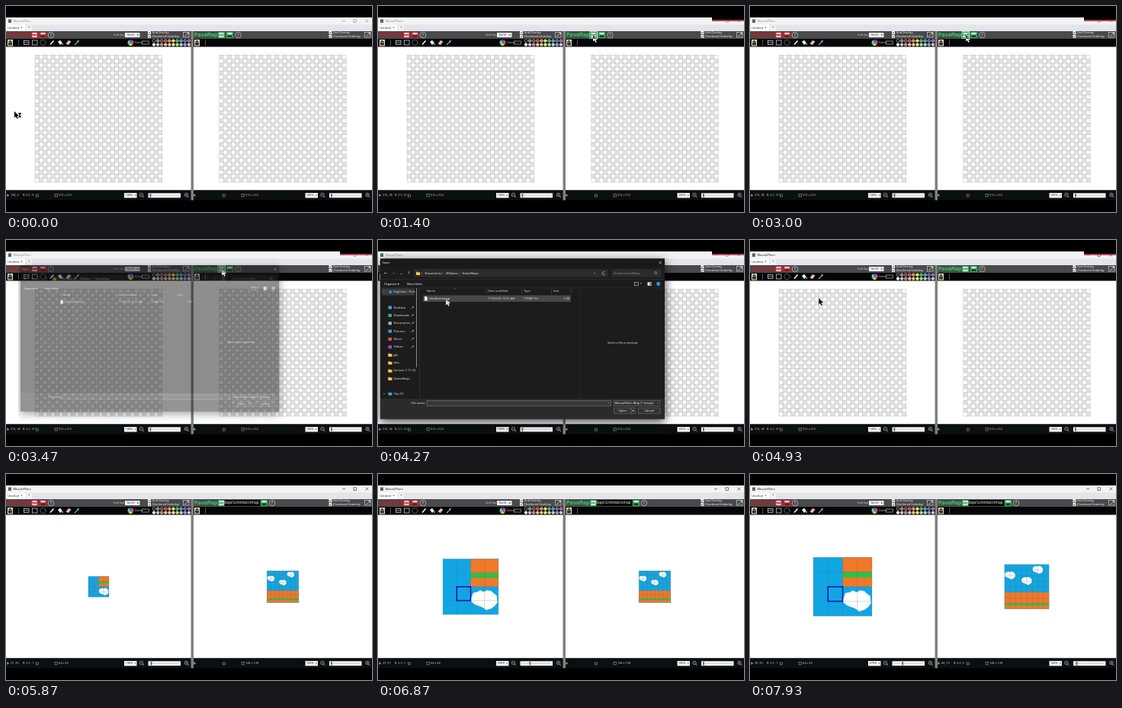
Animation, 480 px wide and 270 px high, one loop 8000 ms. Source, as an HTML page with a canvas:

```html
<!DOCTYPE html>
<html lang="en">
<head>
<meta charset="utf-8">
<title>Tile editor</title>
<style>
html, body { margin: 0; width: 100%; height: 100%; overflow: hidden; background: #000; }
canvas { display: block; width: 480px; height: 270px; }
</style>
</head>
<body>
<canvas id="stage"></canvas>
<script>
const W = 480, H = 270, LOOP = 8000, LOAD = 5130, UNIT = 0.325;
const dpr = window.devicePixelRatio || 1;
const stage = document.getElementById('stage');
const layer = document.createElement('canvas');
for (const c of [stage, layer]) { c.width = W * dpr; c.height = H * dpr; }
const main = stage.getContext('2d'), over = layer.getContext('2d');
let g = main;

const CENTER = [{ x: 121.5, y: 147.7 }, { x: 363, y: 147.7 }];
const PATH = [
  [70, 11, 138], [530, 60, 118], [730, 60, 118], [1130, 204, 77], [1330, 282, 38],
  [1600, 282, 38], [2130, 283, 38], [3870, 283, 38], [4270, 89, 77], [4470, 89, 77],
  [4730, 90, 76], [5330, 90, 76], [5700, 117, 149], [6800, 117, 149], [6930, 119, 156],
  [7000, 119, 156], [7470, 372, 152]
];
const ZOOM_L = [[5730, 110], [5800, 120], [5870, 130], [5930, 140], [6000, 150], [6070, 160],
  [6130, 180], [6200, 190], [6270, 200], [6330, 215], [6470, 240], [6530, 264],
  [6670, 290], [6730, 310], [6800, 330], [6870, 350], [6930, 370]];
const ZOOM_R = [[7600, 110], [7730, 120], [7800, 130], [7870, 140]];
const CLOUD = [[1, 12], [3, 7], [8, 6], [11, 4], [15, 6], [19, 4], [24, 5], [27, 8], [30, 10],
  [31, 18], [28, 22], [24, 25], [18, 27], [14, 24], [9, 22], [4, 20], [0, 16]];
const SWATCHES = ['#000', '#777', '#8b1a1a', '#ed1c24', '#ff7f27', '#fff200', '#22b14c', '#00a2e8', '#3f48cc', '#a349a4',
  '#fff', '#c3c3c3', '#b97a57', '#ffaec9', '#ffc90e', '#efe4b0', '#b5e61d', '#99d9ea', '#7092be', '#c8bfe7'];

const clamp = (v, a, b) => Math.min(b, Math.max(a, v));
const prog = (t, a, b) => clamp((t - a) / (b - a), 0, 1);
const smooth = p => p * p * (3 - 2 * p);

function held(keys, t) {
  let v = 100;
  for (const [at, z] of keys) if (t >= at) v = z;
  return v;
}
function pointer(t) {
  let a = PATH[0];
  for (const b of PATH) {
    if (t < b[0]) {
      const p = smooth(prog(t, a[0], b[0]));
      return { x: a[1] + (b[1] - a[1]) * p, y: a[2] + (b[2] - a[2]) * p };
    }
    a = b;
  }
  return { x: a[1], y: a[2] };
}

function box(x, y, w, h, fill) { g.fillStyle = fill; g.fillRect(x, y, w, h); }
function frame(x, y, w, h, color, lw = 0.7) { g.strokeStyle = color; g.lineWidth = lw; g.strokeRect(x, y, w, h); }
function line(color, lw, ...p) {
  g.strokeStyle = color; g.lineWidth = lw; g.beginPath();
  for (let i = 0; i < p.length; i += 2) g.lineTo(p[i], p[i + 1]);
  g.stroke();
}
function poly(points, fill) {
  g.fillStyle = fill; g.beginPath();
  for (const [x, y] of points) g.lineTo(x, y);
  g.closePath(); g.fill();
}
function dot(x, y, r, fill, stroke, lw = 0.7) {
  g.beginPath(); g.arc(x, y, r, 0, 7);
  if (fill) { g.fillStyle = fill; g.fill(); }
  if (stroke) { g.strokeStyle = stroke; g.lineWidth = lw; g.stroke(); }
}
function text(s, x, y, color = '#fff', size = 4, align = 'left', face = '"Open Sans", sans-serif') {
  g.font = `${size}px ${face}`; g.fillStyle = color;
  g.textAlign = align; g.textBaseline = 'middle';
  g.fillText(s, x, y);
}
function logo(s, x, color) {
  g.font = 'bold 7.2px "DejaVu Sans Mono", monospace'; g.fillStyle = color;
  g.textAlign = 'left'; g.textBaseline = 'middle'; g.fillText(s, x, 38.3);
}

function fileIcon(x, color, save) {
  box(x, 34, 9, 8, color);
  box(x + 1.5, 35, 6, 2.2, '#eee');
  box(x + 1.5, 38.5, 6, 2.5, save ? '#333' : '#eee');
  if (!save) poly([[x + 3, 37.5], [x + 6, 37.5], [x + 4.5, 40]], color);
}
function help(x) {
  dot(x, 38, 3.8, null, '#ddd', 0.6);
  text('?', x, 38.2, '#eee', 5.5, 'center');
}
function check(x, y, label) {
  box(x, y - 2, 4, 4, '#fff');
  line('#222', 0.7, x + 0.8, y, x + 1.7, y + 1.1, x + 3.3, y - 1.2);
  text(label, x + 5.5, y, '#fff', 3.8);
}
function toolbar(x) {
  const cx = x ? 423.5 : 186, ex = x ? 470.5 : 232.5;
  check(cx, 35, 'Grid Overlay');
  check(cx, 39.8, 'Checkered Underlay');
  frame(ex, 34.5, 7.5, 6.5, '#ddd', 0.6);
  line('#eee', 0.7, ex + 2, 40, ex + 7, 35);
  line('#eee', 0.7, ex + 4.5, 35, ex + 7, 35, ex + 7, 37.5);
  box(x + 2, 44, 7, 8.5, '#e9e3bd');
  box(x + 3, 47.5, 5, 4, '#333');
  poly([[x + 3, 47], [x + 8, 47], [x + 5.5, 44.5]], '#333');
  line('#888', 0.6, x + 16.5, 44, x + 16.5, 52);
}
function tools() {
  frame(23.5, 45.5, 6.5, 5, '#ddd'); line('#ddd', 0.6, 23.5, 48, 30, 48);
  frame(34.5, 45, 6.5, 6, '#ddd');
  g.setLineDash([1, 0.8]); dot(48.5, 48, 3.6, null, '#eee'); g.setLineDash([]);
  line('#eee', 1.7, 58, 50.5, 62.5, 45.5);
  poly([[68, 47], [71, 44.8], [74, 48.5], [71, 51]], '#eee'); dot(74.2, 50, 1, '#4ab4ef');
  poly([[78.5, 49.5], [82, 45], [85.5, 46.5], [82, 51]], '#f0b4bb');
  line('#eee', 1, 90, 51, 94, 47); line('#55aee8', 2, 93.5, 47.5, 95.5, 45.2);
  for (let i = 0; i < 6; i++) {
    g.beginPath(); g.moveTo(163.5, 48);
    g.arc(163.5, 48, 4, i * Math.PI / 3, (i + 1) * Math.PI / 3);
    g.fillStyle = `hsl(${i * 60} 75% 58%)`; g.fill();
  }
  text('Color:', 169, 48, '#ddd', 3.7);
  frame(178.5, 46, 9, 4, '#ccc', 0.6);
  SWATCHES.forEach((c, i) => dot(194 + i % 10 * 5.1, i < 10 ? 45.6 : 50.6, 1.9, c, '#ddd', 0.6));
}
function lens(x, sign) {
  dot(x, 247.5, 2.3, null, '#ccc', 0.6);
  line('#ccc', 0.8, x + 1.7, 249.2, x + 3.5, 251);
  line('#ccc', 0.5, x - 1.2, 247.5, x + 1.2, 247.5);
  if (sign) line('#ccc', 0.5, x, 246.3, x, 248.7);
}
function status(x, zx, pos, size, zoom) {
  poly([[x + 1.5, 246], [x + 4, 248.3], [x + 1.5, 250]], '#aaa');
  if (pos) {
    text(`${pos.x}, ${pos.y}`, x + 6, 248.3, '#ddd', 3.8);
    text(`R: ${pos.y >> 4} C: ${pos.x >> 4}`, x + 22, 248.3, '#ddd', 3.8);
  }
  frame(x + 39.3, 247, 3, 3, '#bbb', 0.5);
  frame(x + 64, 246.7, 3.2, 3.2, '#bbb', 0.5);
  text(`${size} x ${size}`, x + 69, 248.3, '#ddd', 3.8);
  box(zx, 245, 16.5, 6.5, '#f4f4f4');
  text(zoom + '%', zx + 1.5, 248.3, '#222', 3.8);
  poly([[zx + 13.3, 247.6], [zx + 15.3, 247.6], [zx + 14.3, 249]], '#444');
  lens(zx + 22.5, false);
  box(zx + 31.5, 245.3, 42.5, 6, '#f4f4f4');
  line('#bbb', 0.7, zx + 33, 248.3, zx + 72, 248.3);
  box(zx + 33.5 + (zoom - 100) / 25, 246, 1.8, 4.5, '#666');
  lens(zx + 81.5, true);
}

function checkers(c) {
  const s = 5.2, x = c.x - 83.2, y = c.y - 83.2;
  for (let r = 0; r < 32; r++) for (let k = r % 2; k < 32; k += 2) box(x + k * s, y + r * s, s, s, '#e2e2e2');
  grid(x, y, 166.4, 32, 'rgba(140,140,140,.55)', 0.5);
}
function grid(x, y, size, n, color, lw) {
  for (let i = 0; i <= n; i++) {
    const d = i * size / n;
    line(color, lw, x + d, y, x + d, y + size);
    line(color, lw, x, y + d, x + size, y + d);
  }
}
function cloud(x, y) { poly(CLOUD.map(p => [p[0] + x, p[1] + y]), '#fff'); }
function art(c, size, zoom, paint) {
  const k = UNIT * zoom / 100, w = size * k, x = c.x - w / 2, y = c.y - w / 2;
  g.save();
  g.translate(x, y); g.scale(k, k);
  box(0, 0, size, size, '#10a6e4');
  paint();
  g.restore();
  grid(x, y, w, size / 16, 'rgba(105,105,105,.5)', 0.55);
  return { x, y, k };
}
function ground(x, y, w, h, grass) {
  box(x, y, w, h, '#f07828');
  box(x, grass, w, 6, '#2bc04a');
}

function cornerButtons(active) {
  const c = active ? '#222' : '#888';
  line(c, 0.6, 441, 19.7, 445, 19.7);
  frame(456, 17.8, 3.6, 3.6, c, 0.6);
  line(c, 0.6, 471.5, 17.8, 475.2, 21.5); line(c, 0.6, 475.2, 17.8, 471.5, 21.5);
}

function app(t, cur) {
  const loaded = t >= LOAD, active = t >= 4670;
  const zl = held(ZOOM_L, t), zr = held(ZOOM_R, t);
  box(0, 0, W, H, '#000');
  box(0, 15, W, 10, '#f3f3f3');
  box(3, 17.5, 4, 4.5, '#47705a');
  text('MosaicPliers', 9.5, 20, active ? '#111' : '#8a8a8a', 4);
  cornerButtons(active);
  if (t >= 330 && t < 5060) { box(438, 15, 42, 3.5, '#000'); box(438, 18.5, 42, 1.3, '#c4122f'); }
  box(0, 24.5, W, 8.5, '#e4e4eb');
  box(0.5, 24.5, 25, 8.5, '#fff'); box(27, 25.5, 7, 7, '#f3f3f6');
  text('Untitled', 2, 28.5, '#222', 4);
  text('×', 20.5, 28.5, '#333', 4.5, 'center');
  text('+', 30.3, 29, '#555', 4.5, 'center');

  box(0, 33, W, 10, '#4a4a4a');
  box(0, 43, W, 10.5, '#050608');
  box(0, 53.5, W, 188, '#fff');
  box(0, 241.5, W, 13, '#0a0f12');
  box(242.5, 33, 3.5, 221.5, '#808080');

  logo('PaveSet', 2, '#d3141c');
  fileIcon(33, '#d8202a', false); fileIcon(44, '#d8202a', true); help(59);
  text('Grid Size:', 141, 38, '#ddd', 3.5);
  box(156, 35, 19.5, 6, '#eee'); text('16x16', 158, 38.1, '#222', 3.7);
  poly([[171.5, 37.4], [174, 37.4], [172.7, 39]], '#333');
  toolbar(0); tools();

  logo('PaveMap', 247, '#25d366');
  if (t >= 1330 && t < 3870) box(277.5, 33.3, 10.5, 9.4, '#eaf8ef');
  fileIcon(278, '#25b455', false);
  if (loaded) {
    box(286.5, 34, 47, 8, '#050505');
    text('Maps\\Untitled.ttmap', 331.5, 38.2, '#fff', 4.8, 'right');
    fileIcon(334, '#25b455', true); help(349);
  } else { fileIcon(289, '#25b455', true); help(304.5); }
  toolbar(245);

  let left, right;
  if (loaded) {
    left = art(CENTER[0], 64, zl, () => { ground(32, 0, 32, 32, 16); cloud(32, 32); });
    right = art(CENTER[1], 128, zr, () => {
      ground(0, 80, 128, 48, 112);
      cloud(0, 16); cloud(80, 0); cloud(48, 32);
    });
    if (t >= 6870) frame(left.x + 16 * left.k, left.y + 32 * left.k, 16 * left.k, 16 * left.k, '#0710b8', 1.5);
  } else CENTER.forEach(checkers);

  let pos = { x: 158, y: 2 }, posR = null;
  const at = (p, o, max) => ({
    x: clamp(Math.round((p.x - o.x) / o.k), 0, max), y: clamp(Math.round((p.y - o.y) / o.k), 0, max)
  });
  if (loaded) {
    pos = at(pointer(Math.min(t, 7000)), left, 63);
    if (cur.x > right.x) posR = at(cur, right, 127);
  } else {
    const p = pointer(Math.min(t, 1130));
    if (p.x > 38.4) pos = at(p, { x: 38.3, y: 64.5, k: UNIT }, 511);
  }
  status(0, 155, pos, loaded ? 64 : 512, zl);
  status(245, 392.5, posR, loaded ? 128 : 512, zr);
}

function folder(x, y) { box(x, y - 2, 2.6, 1.5, '#d99a22'); box(x, y - 1.3, 5.2, 3.6, '#f5c64b'); }
function sidebar() {
  box(5, 63.5, 43, 9, '#3a3a3a');
  text('›', 7, 67.5, '#aaa', 5);
  dot(16.3, 68, 2, '#2493e0');
  text('FogCrate - Pers', 20.5, 68, '#eee', 4);
  const places = [['Desktop', '#2fa8e8'], ['Downloads', '#34b38a'], ['Documents', '#9fb4c4'],
    ['Pictures', '#3b9df0'], ['Music', '#e2574c'], ['Videos', '#9a4fd6'],
    ['gfx'], ['favs'], ['Version 7-17-25'], ['GameMaps']];
  places.forEach(([name, color], i) => {
    const y = 88.5 + i * 10.35;
    if (color) {
      box(13.5, y - 2, 4.5, 4, color);
      line('#aaa', 0.7, 43.5, y + 1.5, 46, y - 1); dot(46, y - 0.8, 0.9, '#aaa');
    } else folder(13.3, y);
    text(name, 20.5, y, '#eee', 4);
  });
  text('⌄', 8, 201, '#ccc', 5, 'center');
  box(13.5, 200, 4.8, 3.6, '#37a7e4'); text('This PC', 20.5, 202.3, '#eee', 4);
  box(50, 63, 1, 104, '#8a8a8a');
}
function button(x, y, w, h, label) {
  box(x, y, w, h, '#333'); frame(x, y, w, h, '#777', 0.5);
  text(label, x + w / 2, y + h / 2, '#fff', 4, 'center');
}
function dialog(full) {
  g.save();
  g.shadowColor = 'rgba(0,0,0,.75)'; g.shadowBlur = 12 * dpr; g.shadowOffsetY = 3 * dpr;
  box(3, 24.5, 373, 210, '#1c1c1c');
  g.restore();
  box(3, 24.5, 373, 11.5, '#191919');
  text('Open', 5.5, 30.2, '#fff', 4);
  line('#ddd', 0.6, 368.5, 28, 372, 31.5); line('#ddd', 0.6, 372, 28, 368.5, 31.5);
  ['←', '→', '⌄', '↑'].forEach((s, i) => text(s, 10 + i * 10.2, 43.5, i === 1 ? '#777' : '#ddd', 5, 'center', '"DejaVu Sans", sans-serif'));
  box(47, 38.3, 255, 10.5, '#2b2b2b'); box(306, 38.3, 66, 10.5, '#2b2b2b');
  folder(50, 43.7);
  text('›', 57, 43.2, '#bbb', 5);
  text('Documents', 61.5, 43.6, '#fff', 4); text('›', 84, 43.2, '#bbb', 5);
  text('2DGame', 88.5, 43.6, '#fff', 4); text('›', 106.5, 43.2, '#bbb', 5);
  text('GameMaps', 110.5, 43.6, '#fff', 4);
  text('⌄', 284, 42.8, '#ccc', 5, 'center', '"DejaVu Sans", sans-serif');
  g.beginPath(); g.arc(296, 43.6, 2, 0.3, 5.6); g.strokeStyle = '#ddd'; g.lineWidth = 0.6; g.stroke();
  text('Search GameMaps', 309, 43.6, '#999', 4);
  dot(364, 43, 1.5, null, '#aaa', 0.6); line('#aaa', 0.6, 365.2, 44.2, 366.7, 45.7);
  line('#383838', 0.5, 3, 51.5, 376, 51.5);
  text('Organize ▾', 8, 57.5, '#fff', 4); text('New folder', 38, 57.5, '#fff', 4);
  frame(336.5, 55.5, 5, 4, '#ccc', 0.6); text('▾', 344, 57.5, '#ccc', 3.5);
  box(353.5, 55.3, 5, 4.5, '#eee'); box(356, 56, 2, 3, '#777');
  dot(367.7, 57.5, 2.7, '#1787d0'); text('?', 367.7, 57.6, '#fff', 4, 'center');
  line('#3a3a3a', 0.5, 3, 62.8, 376, 62.8);
  if (full) sidebar();
  line('#3a3a3a', 0.6, 54.5, 63, 54.5, 208);
  text('⌃', 101, 64.5, '#aaa', 4, 'center');
  text('Name', 64, 67.2, '#ddd', 4); text('Date modified', 144, 67.2, '#ddd', 4);
  text('Type', 191, 67.2, '#ddd', 4); text('Size', 230, 67.2, '#ddd', 4);
  for (const x of [142, 188.5, 227.5, 253]) line('#555', 0.5, x, 64, x, 71);
  if (full) { box(59, 72.5, 194, 8.5, '#484848'); }
  poly([[61, 74], [63.5, 74], [64.8, 75.3], [64.8, 79.5], [61, 79.5]], '#f2f2f2');
  text('Untitled.ttmap', 67, 76.8, '#fff', 4); text('7/18/2025 10:56 AM', 144, 76.8, '#ddd', 3.8);
  text('TTMAP File', 191, 76.8, '#ddd', 3.8); text('2 KB', 251.5, 76.8, '#ddd', 3.8, 'right');
  line('#333', 0.6, 265, 63, 265, 208);
  text('Select a file to preview.', 321, 135, '#eee', 3.8, 'center');
  box(3, 208, 373, 26.5, '#2b2b2b');
  text('File name:', 62.5, 214, '#eee', 4, 'right');
  box(64, 210.3, 241.5, 7, '#383838'); frame(64, 210.3, 241.5, 7, '#888', 0.5);
  text('⌄', 302.5, 213, '#ccc', 4, 'center');
  box(309, 210.3, 61, 7, '#333'); frame(309, 210.3, 61, 7, '#777', 0.5);
  text('MosaicPliers Map (*.ttmap)', 310.5, 213.9, '#fff', 4);
  text('⌄', 367, 213, '#ccc', 4, 'center');
  button(309.5, 220, 22.5, 7.5, 'Open'); button(332, 220, 5.5, 7.5, '▾');
  button(341.5, 220, 28.5, 7.5, 'Cancel');
}
function overlay(t) {
  const open = prog(t, 3370, 3570), close = prog(t, 4670, 4850);
  if (!open || close === 1) return;
  over.setTransform(dpr, 0, 0, dpr, 0, 0);
  over.clearRect(0, 0, W, H);
  g = over; dialog(t >= 3670); g = main;
  const k = close ? 1 - 0.073 * close : 0.82 + 0.18 * open;
  g.save();
  g.globalAlpha = open * (1 - close);
  g.translate(188.5, 129); g.scale(k, k); g.translate(-189.5, -129.5);
  if (k === 1) g.translate(1, 0.5);
  g.drawImage(layer, 0, 0, W, H);
  g.restore();
}

function drawPointer(t, { x, y }) {
  if (t >= 5600) {
    line('#777', 0.8, x - 3, y, x + 3, y); line('#777', 0.8, x, y - 3, x, y + 3);
    return;
  }
  g.save();
  g.globalCompositeOperation = 'difference';
  poly([[0, 0], [0, 8.5], [1.9, 6.8], [3.3, 9.8], [4.8, 9.1], [3.4, 6.2], [6, 6]].map(p => [p[0] + x, p[1] + y]), '#fff');
  if (t < 530) poly([[5, 2], [9, 2], [7.4, 5], [9, 8], [5, 8], [6.6, 5]].map(p => [p[0] + x, p[1] + y]), '#fff');
  g.restore();
}

function draw(now) {
  const t = now % LOOP, cur = pointer(t);
  g.setTransform(dpr, 0, 0, dpr, 0, 0);
  app(t, cur);
  overlay(t);
  drawPointer(t, cur);
}
let start = null;
function tick(now) {
  if (start === null) start = now;
  draw(now - start);
  requestAnimationFrame(tick);
}
draw(0);
requestAnimationFrame(tick);
</script>
</body>
</html>
```
